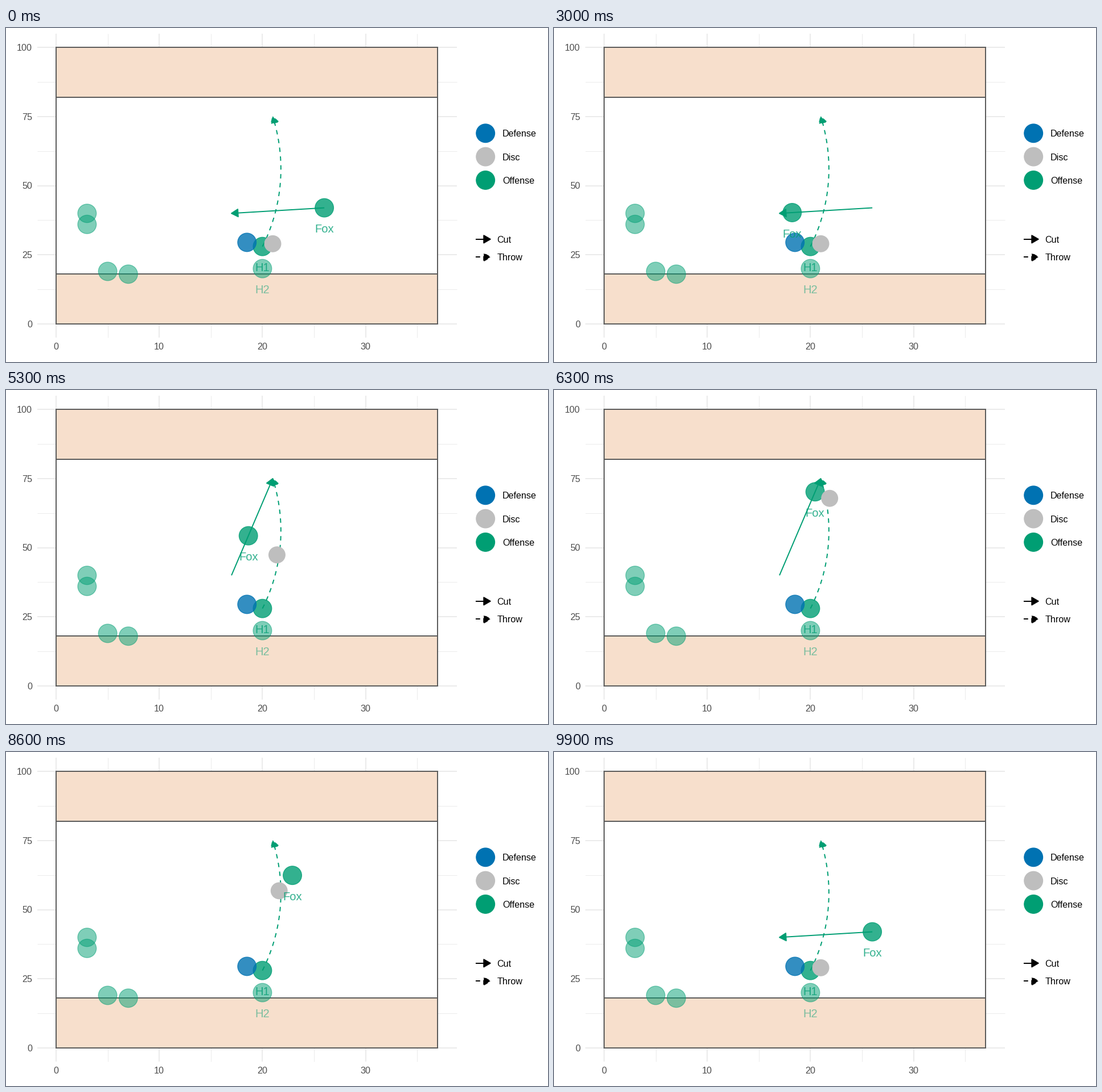
A matplotlib script for the animation above (10000 ms loop, 952x588 px).

```python
import numpy as np
import matplotlib.pyplot as plt
from matplotlib.animation import FuncAnimation
from matplotlib.patches import Circle, Polygon, Rectangle

W, H, DPI = 952, 588, 100
PT = 72 / DPI                      # points per pixel
GREEN, BLUE, GREY = "#009E73", "#0072B2", "#BEBEBE"
LINE = 1.95                        # main line weight in pixels
HEAD = 13.2                        # side length of an arrow head

plt.rcParams["font.family"] = "Liberation Sans"
fig = plt.figure(figsize=(W / DPI, H / DPI), dpi=DPI, facecolor="white")
ax = fig.add_axes([0, 0, 1, 1])
ax.set_xlim(0, W)
ax.set_ylim(H, 0)
ax.axis("off")


def px(p):
    """Field coordinates to stage pixels."""
    return np.array([88.0 + 18.12 * p[0], 520.9 - 4.865 * p[1]])


def line(pts, color, width=LINE, z=1, dashed=False):
    x, y = np.transpose(pts)
    style = (0, (4, 4)) if dashed else "-"
    return ax.plot(x, y, color=color, lw=width * PT, ls=style, zorder=z,
                   solid_capstyle="butt", dash_capstyle="butt")[0]


def arrow(pts, color, dashed=False, z=4):
    """Polyline with a closed, filled head on its last point."""
    pts = np.asarray(pts, float)
    tip = pts[-1]
    d = tip - pts[-2]
    d /= np.hypot(*d)
    side = np.array([-d[1], d[0]])
    base = tip - d * HEAD * np.cos(np.pi / 6)
    corners = [base + side * HEAD / 2, tip, base - side * HEAD / 2]
    head = Polygon(corners, closed=True, fc=color, ec=color, lw=LINE * PT,
                   ls=(0, (4, 4)) if dashed else "-", joinstyle="round", zorder=z)
    ax.add_patch(head)
    return [line(pts, color, z=z, dashed=dashed), head]


def dot(center, color, alpha=1.0, r=16.3, z=5):
    return ax.add_patch(Circle(center, r, fc=color, ec=color, alpha=alpha,
                               lw=1.3 * PT, zorder=z))


def text(x, y, s, size=16.1, color="black", ha="left", alpha=1.0, z=9):
    """Text whose capitals are centred on y."""
    return ax.text(x, y + 0.358 * size, s, fontsize=size * PT, color=color,
                   ha=ha, va="baseline", alpha=alpha, zorder=z)


def label(p, s, alpha):
    x, y = px(p)
    return text(x, y + 36.5, s, 20.2, GREEN, "center", alpha)


def arc(a, b, bend=0.196, n=80):
    """Circular arc from a to b, bulging to the right of travel."""
    a, b = np.asarray(a), np.asarray(b)
    half = np.hypot(*(b - a)) / 2
    u = (b - a) / (2 * half)
    normal = np.array([-u[1], u[0]])
    sag = bend * half
    r = (half ** 2 + sag ** 2) / (2 * sag)
    center = (a + b) / 2 - normal * (r - sag)
    t = np.linspace(-1, 1, n)[:, None] * np.arcsin(half / r)
    return center + r * (np.sin(t) * u + np.cos(t) * normal)


def draw_field():
    left, right, top, bottom = 54.5, 792.0, 10.1, 545.2
    for i in range(8):
        x = px((5 * i, 0))[0]
        line([(x, top), (x, bottom)], "#EBEBEB", LINE / (1 + i % 2))
        if i % 2 == 0:
            text(x, 560, str(5 * i), color="#4D4D4D", ha="center")
    for i in range(9):
        y = px((0, 12.5 * i))[1]
        line([(left, y), (right, y)], "#EBEBEB", LINE / (1 + i % 2))
        if i % 2 == 0:
            text(46, y, f"{12.5 * i:.0f}", color="#4D4D4D", ha="right")
    for lo, hi, fill in ((18, 82, "white"), (0, 18, "#F7DFCC"), (82, 100, "#F7DFCC")):
        a, b = px((0, lo)), px((37, hi))
        ax.add_patch(Rectangle(a, *(b - a), fc=fill, ec="#595959",
                               lw=LINE * PT, zorder=2))


def draw_legend():
    rows = (("Defense", BLUE), ("Disc", GREY), ("Offense", GREEN))
    for i, (name, color) in enumerate(rows):
        y = 185.3 + 41.3 * i
        dot((842.2, y), color)
        text(872, y + 0.3, name)
    for i, name in enumerate(("Cut", "Throw")):
        y = 371.8 + 31.6 * i
        arrow([(825.3, y), (850.7, y)], "black", dashed=i == 1)
        text(862.6, y, name)


# Key positions of the moving pieces
FOX = np.array([(26, 42), (17, 40), (21, 75)], float)
DISC = np.array([(21, 29), (21, 29), (22, 74)], float)

draw_field()
draw_legend()
arrow(arc(px((20, 28)), px((21, 75))), GREEN, dashed=True)
cuts = [arrow([px(FOX[i]), px(FOX[i + 1])], GREEN) for i in (0, 1)]

for spot in ((3, 40), (3, 36), (5, 19), (7, 18), (20, 20)):
    dot(px(spot), GREEN, 0.5)
dot(px((20, 28)), GREEN, 0.8)
fox = dot(px(FOX[0]), GREEN, 0.8)
dot(px((18.5, 29.5)), BLUE, 0.8, z=6)
disc = dot(px(DISC[0]), GREY, r=14.3, z=7)
label((20, 28), "H1", 0.8)
label((20, 20), "H2", 0.5)
fox_name = label(FOX[0], "Fox", 0.8)


def phase(k):
    """Leg number and progress along it."""
    if k < 33:
        return 0, max(0, k - 11) / 22
    if k < 66:
        return 1, (k - 44) / 22 if k > 45 else 0.0
    return 2, max(0, k - 78) / 21


def update(k):
    leg, t = phase(k)
    nxt = (leg + 1) % 3
    f = px(FOX[leg] + t * (FOX[nxt] - FOX[leg]))
    fox.center = f
    disc.center = px(DISC[leg] + t * (DISC[nxt] - DISC[leg]))
    fox_name.set_position((f[0], f[1] + 36.5 + 0.358 * 20.2))
    shown = nxt if t >= 1 else leg
    for i, parts in enumerate(cuts):
        for part in parts:
            part.set_visible(i == shown)
    return []


anim = FuncAnimation(fig, update, frames=100, interval=100, repeat=True,
                     repeat_delay=0, init_func=lambda: update(0))
plt.show()
```
